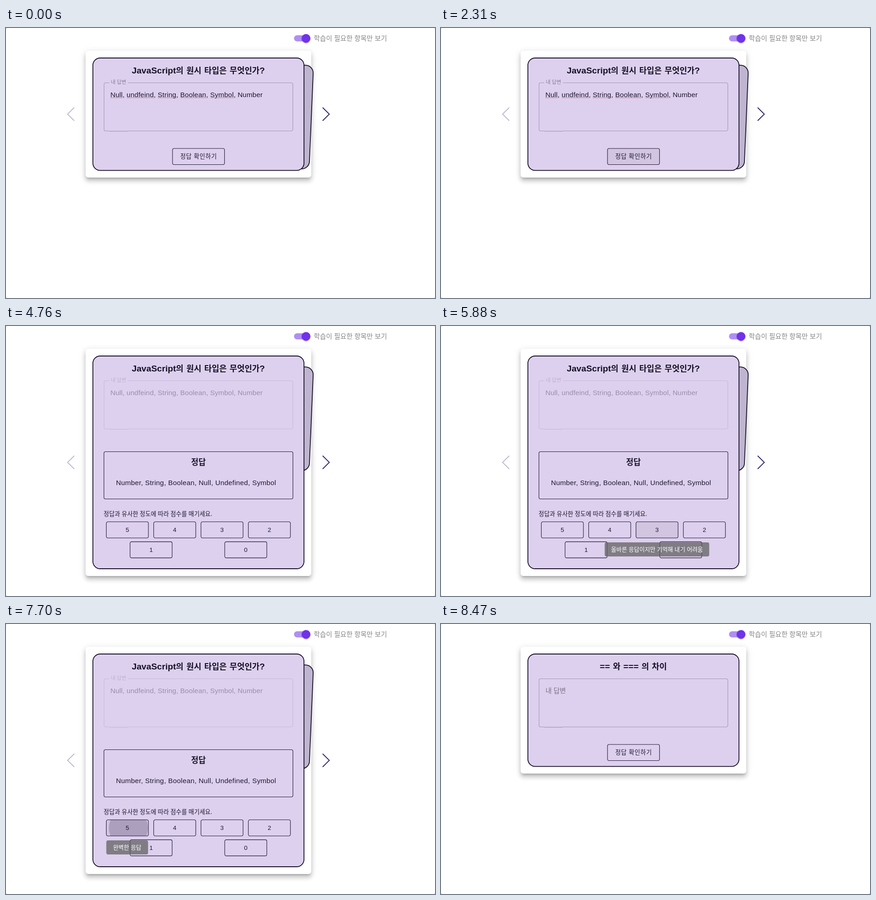
An HTML page that plays this animation: 943 by 594 pixels, repeating every 9.03 s.

```html
<!DOCTYPE html>
<html lang="ko">
<head>
<meta charset="utf-8">
<title>학습 카드</title>
<style>
  html, body { margin: 0; width: 100%; height: 100%; overflow: hidden; background: #888; }
  .stage { position: relative; width: 943px; height: 594px; overflow: hidden; background: #fff; border-radius: 2px; }
  .paper {
    position: absolute; left: 175px; top: 50px; width: 496px; height: 279px;
    border-radius: 6px; background: #fff;
    box-shadow: 0 5px 5px -3px rgba(0,0,0,.2), 0 8px 10px 1px rgba(0,0,0,.14), 0 3px 14px 2px rgba(0,0,0,.1);
  }
  svg { position: absolute; left: 0; top: 0; }
  text { font-family: "Liberation Sans", "Noto Sans CJK KR", Arial, sans-serif; fill: #1d1630; }
  .ko { font-family: "Noto Sans CJK KR", "Noto Sans CJK", sans-serif; }
  .mid { text-anchor: middle; }
  .title { font-size: 17.9px; font-weight: 700; word-spacing: 1.4px; fill: #150f26; }
  .title tspan { font-size: 19.2px; }
  .input { font-size: 15.25px; letter-spacing: .143px; }
  .answer { font-size: 15.25px; letter-spacing: .29px; }
  .num { font-size: 13.6px; text-anchor: middle; }
  .card { fill: #ddd0ee; stroke: #150f26; stroke-width: 1.8; }
  .line { fill: none; stroke: #1d1633; stroke-width: 1.1; }
  .edge { fill: none; stroke: #a093b8; stroke-width: 1.1; }
  .shade { fill: #000; fill-opacity: .05; }
  .arrow { fill: none; stroke-width: 1.8; }
  .tip rect { fill: #616161; fill-opacity: .75; }
  .tip text { font-size: 12.75px; fill: #fff; text-anchor: middle; }

  .paper, .short, .long, .first, .next, .drop, .field, .spell, .ripple { animation: 9030ms step-end infinite; }
  .paper { animation-name: grow; }
  .short { animation-name: short; }
  .long { animation-name: long; }
  .first { animation-name: first; }
  .next { animation-name: next; }
  .drop { animation-name: drop; }
  .field { animation-name: dim; }
  .spell { animation-name: spell; }
  .ripple { animation-name: ripple; transform-box: fill-box; transform-origin: center; }
  .press { animation: press 9030ms linear infinite; }
  .on3, .on4, .on5 { animation: on3 9030ms linear infinite; transform-box: fill-box; transform-origin: 50% 0; }
  .on4 { animation-name: on4; }
  .on5 { animation-name: on5; }
  .shade { scale: 1 !important; }

  @keyframes grow { 0% { height: 279px } 26.347% { height: 500px } 86.04%, 100% { height: 279px } }
  @keyframes short { 0% { visibility: visible } 26.347% { visibility: hidden } 86.04%, 100% { visibility: visible } }
  @keyframes long { 0% { visibility: hidden } 26.347% { visibility: visible } 86.04%, 100% { visibility: hidden } }
  @keyframes first { 0% { visibility: visible } 86.04%, 100% { visibility: hidden } }
  @keyframes next { 0% { visibility: hidden } 86.04%, 100% { visibility: visible } }
  @keyframes drop { 0% { translate: 0 0 } 26.347%, 100% { translate: 0 var(--d) } }
  @keyframes dim { 0% { opacity: 1 } 26.347%, 100% { opacity: .36 } }
  @keyframes spell { 0% { opacity: 1 } 26.347%, 100% { opacity: 0 } }
  @keyframes press {
    0%, 23.25% { opacity: 0; animation-timing-function: steps(3, jump-start) }
    25.57%, 26.34% { opacity: 1 }
    26.347%, 100% { opacity: 0 }
  }
  @keyframes ripple {
    0% { opacity: 0; scale: 0 }
    84.49% { opacity: .15; scale: .6 }
    85.26% { opacity: .21; scale: 1 }
    86.04%, 100% { opacity: 0; scale: 0 }
  }
  @keyframes on3 {
    0%, 58.13% { opacity: 0; scale: .75 .56; animation-timing-function: steps(4, jump-start) }
    61.23%, 68.98% { opacity: 1; scale: 1 1; animation-timing-function: steps(3, jump-start) }
    71.31%, 100% { opacity: 0; scale: .75 .56 }
  }
  @keyframes on4 {
    0%, 68.98% { opacity: 0; scale: .75 .56; animation-timing-function: steps(3, jump-start) }
    71.31%, 75.96% { opacity: 1; scale: 1 1; animation-timing-function: steps(4, jump-start) }
    79.06%, 100% { opacity: 0; scale: .75 .56 }
  }
  @keyframes on5 {
    0%, 75.96% { opacity: 0; scale: .75 .56; animation-timing-function: steps(4, jump-start) }
    79.06%, 100% { opacity: 1; scale: 1 1 }
  }
</style>
</head>
<body>
<div class="stage">
  <div class="paper"></div>
  <svg width="943" height="594" viewBox="0 0 943 594">
    <defs>
      <rect id="btn" width="92.5" height="35.5" rx="3.5"/>
      <clipPath id="five"><use href="#btn" x="220.5" y="430.8"/></clipPath>
      <filter id="soft" x="-50%" y="-50%" width="200%" height="200%">
        <feDropShadow dx="0" dy="1.2" stdDeviation="1.3" flood-opacity=".35"/>
      </filter>
    </defs>

    <!-- toggle -->
    <rect x="633" y="16" width="34" height="13.6" rx="6.8" fill="#b08ff3"/>
    <circle cx="659.5" cy="22.8" r="9.6" fill="#7030ea" filter="url(#soft)"/>
    <text class="ko" x="676.5" y="28" style="font-size:14.7px;fill:#858585">학습이 필요한 항목만 보기</text>

    <!-- card behind and arrows -->
    <g class="first">
      <g class="drop" style="--d:8.3px">
        <rect x="-200" width="200" height="228.3" rx="17" transform="translate(675.9 82.5) rotate(2.4)"
              fill="#c0b5d0" stroke="#150f26" stroke-width="1.8"/>
      </g>
      <g class="drop" style="--d:110.5px">
        <path class="arrow" d="M150 175L135.3 189.5L150 204" stroke="#bdb5cf"/>
        <path class="arrow" d="M696 175L710.7 189.5L696 204" stroke="#2b1c70"/>
      </g>
    </g>

    <rect class="card short" x="191" y="66" width="464" height="247.3" rx="16"/>
    <rect class="card long" x="191" y="66" width="464" height="468" rx="16"/>

    <!-- first question -->
    <g class="first">
      <text class="title mid" x="422.8" y="100"><tspan>JavaScript</tspan>의 원시 타입은 무엇인가<tspan>?</tspan></text>
      <g class="field">
        <path class="edge" d="M268 120.5H627a3.5 3.5 0 0 1 3.5 3.5V223a3.5 3.5 0 0 1 -3.5 3.5H268l-1 .6H228l-1 -.6H219a3.5 3.5 0 0 1 -3.5 -3.5V124a3.5 3.5 0 0 1 3.5 -3.5H227"/>
        <text class="ko" x="230.5" y="123.3" style="font-size:11.1px;fill:#857b96">내 답변</text>
        <text class="input" x="229.5" y="152">Null, undfeind, String, Boolean, Symbol, Number</text>
      </g>
      <path class="spell" d="M230 153.5H257M266 153.5H325M334 153.5H374M384 153.5H440M450 153.5H501"
            fill="none" stroke="#d5557c" stroke-width="1.3" stroke-dasharray="1.6 1.4"/>
    </g>

    <!-- second question -->
    <g class="next">
      <text class="title mid" x="422.8" y="100"><tspan>==</tspan> 와 <tspan>===</tspan> 의 차이</text>
      <path class="edge" d="M219 120.5H627a3.5 3.5 0 0 1 3.5 3.5V223a3.5 3.5 0 0 1 -3.5 3.5H268l-1 .6H228l-1 -.6H219a3.5 3.5 0 0 1 -3.5 -3.5V124a3.5 3.5 0 0 1 3.5 -3.5Z"/>
      <text class="ko" x="229.8" y="151.6" style="font-size:14.7px;fill:#7b7189">내 답변</text>
    </g>

    <!-- check button -->
    <g class="short">
      <rect class="shade press" x="366" y="265" width="114.4" height="35.5" rx="3.5"/>
      <rect class="line" x="366" y="265" width="114.4" height="35.5" rx="3.5"/>
      <text class="ko mid" x="423.4" y="287" style="font-size:13.2px;letter-spacing:.6px">정답 확인하기</text>
    </g>

    <!-- answer and scores -->
    <g class="long">
      <rect class="line" x="215.3" y="276.5" width="415.4" height="104" rx="3.5"/>
      <text class="ko mid" x="423" y="306" style="font-size:17.7px;font-weight:700">정답</text>
      <text class="answer mid" x="417.7" y="349.5">Number, String, Boolean, Null, Undefined, Symbol</text>
      <text class="ko" x="214.6" y="417.8" style="font-size:13.08px">정답과 유사한 정도에 따라 점수를 매기세요.</text>

      <use class="shade on5" href="#btn" x="220.5" y="430.8"/>
      <use class="shade on4" href="#btn" x="324.6" y="430.8"/>
      <use class="shade on3" href="#btn" x="428.6" y="430.8"/>
      <g clip-path="url(#five)"><circle class="ripple" cx="269" cy="448.5" r="43" fill="#1a1230"/></g>

      <g class="line">
        <use href="#btn" x="220.5" y="430.8"/>
        <use href="#btn" x="324.6" y="430.8"/>
        <use href="#btn" x="428.6" y="430.8"/>
        <use href="#btn" x="532.7" y="430.8"/>
        <use href="#btn" x="272.7" y="474.6"/>
        <use href="#btn" x="480.8" y="474.6"/>
      </g>
      <text class="num" x="266.8" y="453.4">5</text>
      <text class="num" x="370.8" y="453.4">4</text>
      <text class="num" x="474.9" y="453.4">3</text>
      <text class="num" x="579" y="453.4">2</text>
      <text class="num" x="319" y="497.2">1</text>
      <text class="num" x="527" y="497.2">0</text>

      <g class="tip on3">
        <rect x="359.8" y="476" width="229.8" height="31" rx="4"/>
        <text class="ko" x="474.8" y="496.2">올바른 응답이지만 기억해 내기 어려움</text>
      </g>
      <g class="tip on4">
        <rect x="291" y="476" width="159.6" height="31" rx="4"/>
        <text class="ko" x="370.8" y="496.2">망설임 후의 올바른 응답</text>
      </g>
      <g class="tip on5">
        <rect x="220.5" y="476" width="91.8" height="31" rx="4"/>
        <text class="ko" x="266.5" y="496.2">완벽한 응답</text>
      </g>
    </g>
  </svg>
</div>
</body>
</html>
```
